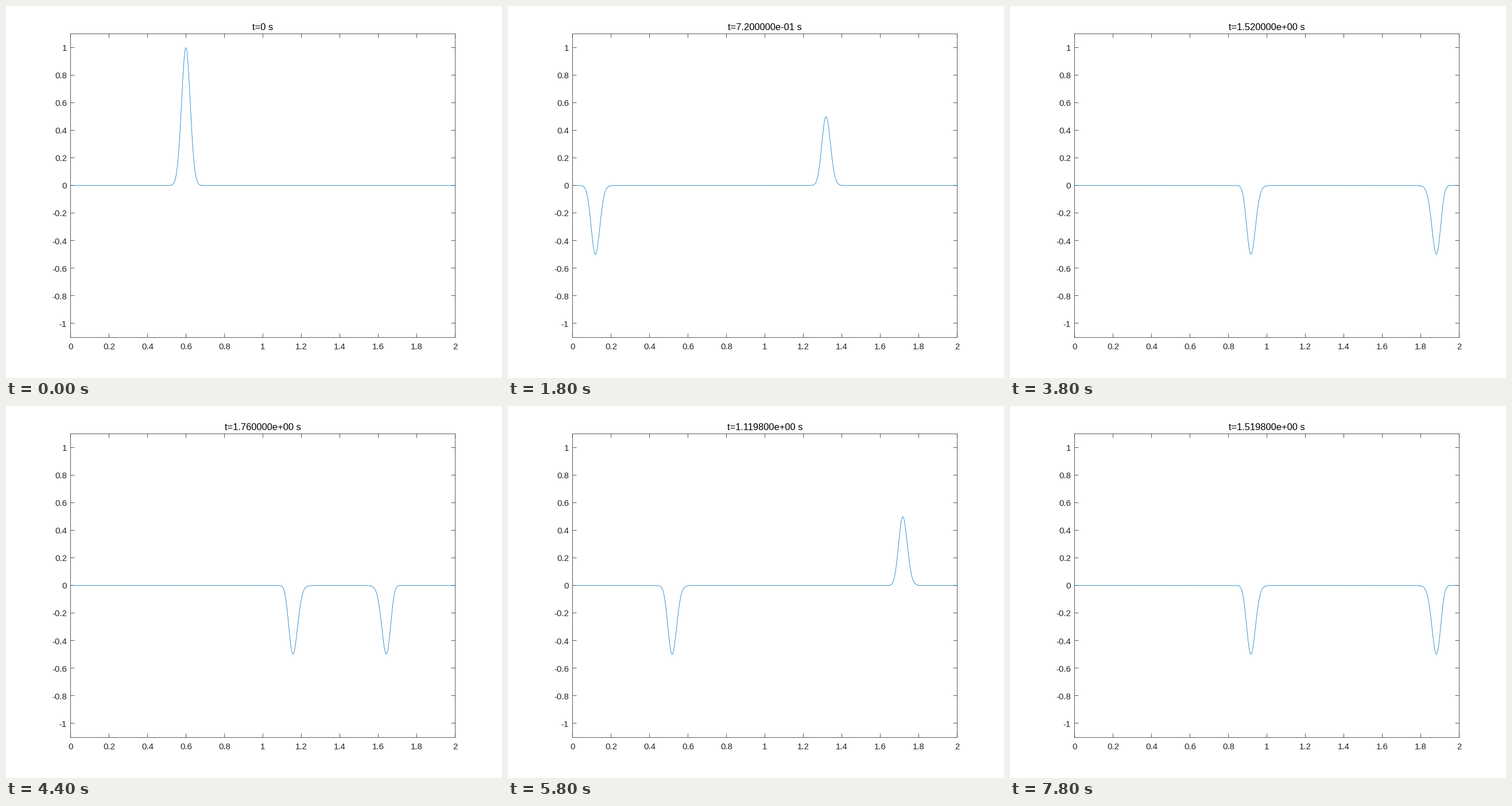
Animation, 864 px wide and 648 px high, one loop 8000 ms. Source, as a matplotlib script:

```python
import numpy as np
import matplotlib.pyplot as plt
from matplotlib.animation import FuncAnimation

plt.rcParams["font.family"] = "Liberation Sans"

W, H, DPI = 864, 648, 144
LEFT, RIGHT, TOP, BOTTOM = 112.5, 782.1, 48.5, 577
MID = (TOP + BOTTOM) / 2
INK, BLUE = "#262626", "#0072BD"
FRAMES, INTERVAL = 40, 200
TICK = 7
PT = 72 / DPI  # points per pixel
THIN = 0.75 * PT

# Pulse on a string of length 2 with fixed ends, as a sum of standing waves.
# DX is the grid step whose slight dispersion skews the travelling pulses.
DX, CENTRE, SHARP = 0.0025, 0.6, 1000
x = np.linspace(0, 2, 801)
k = np.arange(1, 221) * np.pi / 2
amp = np.sqrt(np.pi / SHARP) * np.exp(-k**2 / (4 * SHARP)) * np.sin(k * CENTRE)
omega = 2 / DX * np.sin(k * DX / 2)
modes = np.sin(np.outer(x, k))


def px(v):
    return LEFT + v * (RIGHT - LEFT) / 2


def py(v):
    return MID - v * (BOTTOM - TOP) / 2.2


def time_at(i):
    """Fast run from 0 to 2 s, then a slower run from the middle."""
    return 0.08 * i if i <= 25 else 0.9998 + 0.04 * (i - 26)


def caption(t):
    return f"t={t:.0f} s" if abs(t - round(t)) < 1e-9 else f"t={t:.6e} s"


fig = plt.figure(figsize=(W / DPI, H / DPI), dpi=DPI, facecolor="white")
ax = fig.add_axes([0, 0, 1, 1])
ax.set_xlim(0, W)
ax.set_ylim(H, 0)
ax.axis("off")


def rule(xs, ys):
    """Thin line through pixel centres."""
    ax.plot(np.floor(xs) + 0.5, np.floor(ys) + 0.5, color=INK, lw=THIN,
            solid_capstyle="butt", solid_joinstyle="miter", snap=False)


def label(lx, ly, v, ha):
    ax.text(lx, ly, f"{v:g}", size=15 * PT, color=INK, ha=ha, va="baseline")


rule([LEFT, RIGHT, RIGHT, LEFT, LEFT], [TOP, TOP, BOTTOM, BOTTOM, TOP])
for n in range(11):
    v = n / 5
    rule([px(v)] * 2, [BOTTOM, BOTTOM - TICK])
    rule([px(v)] * 2, [TOP, TOP + TICK])
    label(px(v), 598.5, v, "center")
    v = (n - 5) / 5
    rule([LEFT, LEFT + TICK], [py(v)] * 2)
    rule([RIGHT, RIGHT - TICK], [py(v)] * 2)
    label(106, py(v) + 5.7, v, "right")

title = ax.text((LEFT + RIGHT) / 2, 42, "", size=16.5 * PT, color="black",
                ha="center", va="baseline")
wave, = ax.plot([], [], color=BLUE, lw=THIN, snap=False)


def draw(i):
    t = time_at(i)
    wave.set_data(px(x), py(modes @ (amp * np.cos(omega * t))))
    title.set_text(caption(t))
    return wave, title


anim = FuncAnimation(fig, draw, frames=FRAMES, interval=INTERVAL,
                     init_func=lambda: draw(0), repeat=True, repeat_delay=0)
plt.show()
```
